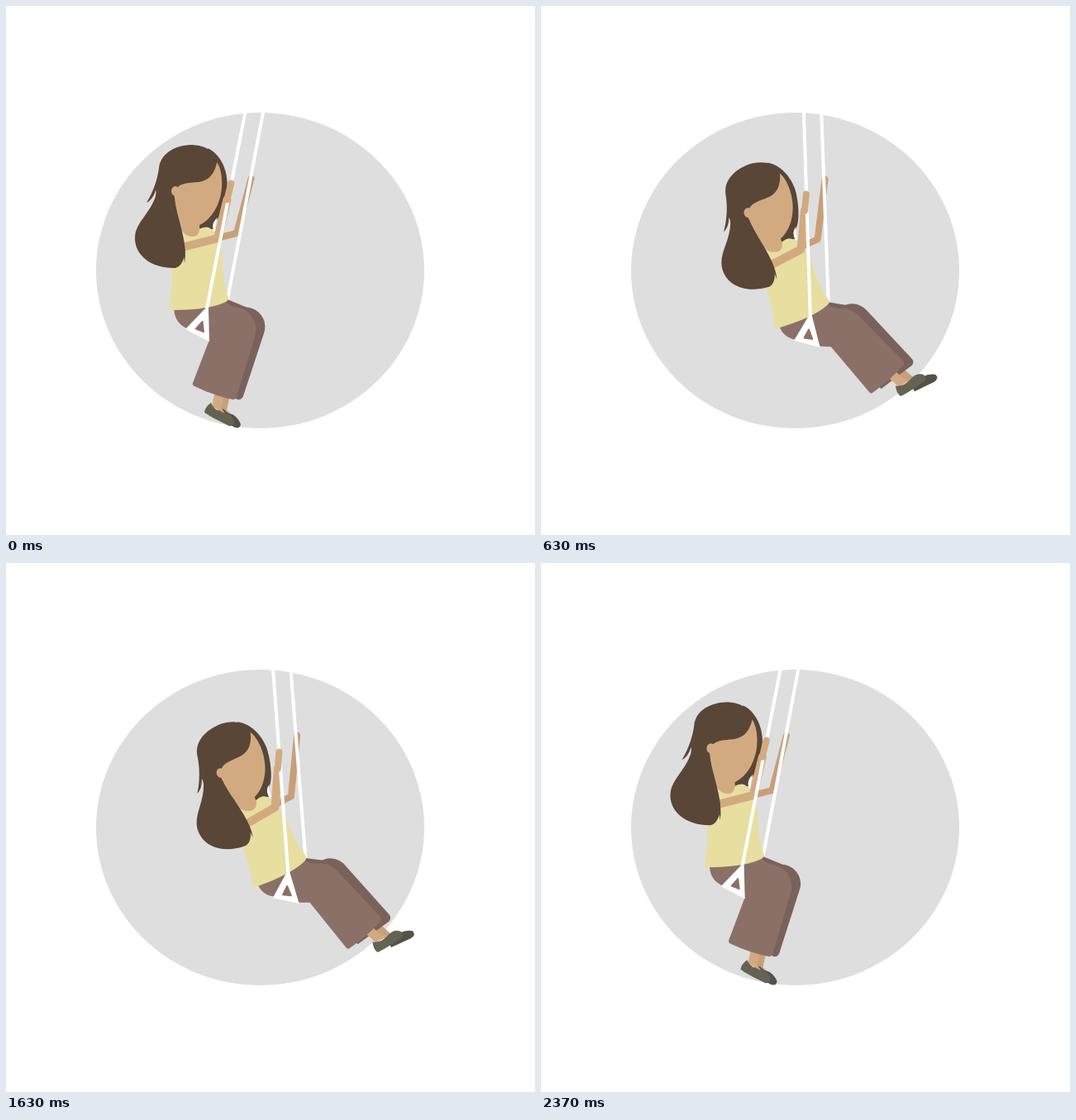
These frames come from a looping animation (640x640 px, 2.41 s). An HTML page:

```html
<!DOCTYPE html>
<html lang="en">
<head>
<meta charset="utf-8">
<title>Girl on a swing</title>
<style>
  html, body { margin: 0; width: 100%; height: 100%; overflow: hidden; background: #fff; }
  svg { display: block; width: 100vw; height: 100vh; }
  .arm { fill: none; stroke-linecap: round; stroke-linejoin: round; }
  .rope { stroke: #fff; stroke-width: 4; }
  .hair { fill: #594637; }
  .skin { fill: #d3aa80; }
  .skin2 { fill: #c99f77; }
  .pants { fill: #8b7068; }
  .pants2 { fill: #7a625b; }
</style>
</head>
<body>
<svg viewBox="0 0 640 640">
  <ellipse cx="307.5" cy="320" rx="198.5" ry="191" fill="#dedede"/>

  <g data-part="torso">
    <path class="hair" d="M244 172C262 180 270 205 267 222C265 240 260 256 252 262L251 270L233 270L238 240Z"/>
    <path fill="#fff" d="M256 256Q248 262 251 272L254 272Q252 264 256 256Z"/>
  </g>

  <polyline id="backArm" class="arm" stroke="#c99f77" stroke-width="8"/>
  <g data-part="swing"><path class="rope" d="M335 3L268 355"/></g>

  <g data-part="backShin">
    <path class="skin2" d="M261 468L271 471L267 489L275 496L258 492Z"/>
    <path fill="#545146" d="M258 487L254 494L275 509Q283 513 284 506Q281 498 274 494Q267 493 264 488Z"/>
    <path class="pants2" d="M268 380L237 457L280 476Q285 477 287 472L312 396A23 23 0 0 0 268 380Z"/>
  </g>
  <g data-part="swing">
    <path class="pants2" d="M255 352L268 355L297 367A22 22 0 0 1 290 410L255 400Z"/>
  </g>
  <g data-part="shin">
    <path class="skin" d="M253 466L264 469L260 486L266 494L249 484Z"/>
    <path fill="#646353" d="M248 480Q241 485 240 491Q241 494 270 508Q276 509 276 502Q274 494 264 492Q252 490 248 480Z"/>
    <path class="pants" d="M254 383L226 456Q225 459 228 460Q250 471 274 476Q277 477 279 473L301 400A22 24 0 0 0 254 383Z"/>
  </g>
  <g data-part="swing">
    <path class="pants" d="M203 362C203 386 216 388 226 394L247 405L280 414A22 22 0 0 0 289 372L262 356Z"/>
  </g>

  <g data-part="torso">
    <path fill="#e8de9f" d="M214 277L233 270Q245 264 250 272C256 282 261 292 262 305Q262 335 269 352Q270 356 266 358Q245 368 200 368Q196 368 197 364C202 345 201 325 200 310Z"/>
    <path class="skin" d="M206 212L252 186C263 194 263 222 258 235C254 248 245 260 234 265C235 272 233 279 226 279C219 279 214 275 212 270L204 234Z"/>
  </g>

  <polyline id="frontArm" class="arm" stroke="#d3aa80" stroke-width="10"/>
  <g data-part="swing">
    <path class="rope" d="M314 3L242 371"/>
    <path fill="#fff" d="M240 367L245 367L246 406L217 391Z"/>
    <path fill="#8b7068" stroke="#8b7068" stroke-width="2" stroke-linejoin="round" d="M237.500 382L239 394L230 390.500Z"/>
  </g>
  <polyline id="hand" class="arm" stroke="#d3aa80" stroke-width="8"/>

  <g data-part="torso">
    <path class="hair" d="M250 178C256 183 256 188 254 194C250 206 243 212 232 213C222 214 213 214 208 219Q203 222 204 232C206 250 213 268 216 288C218 302 213 317 203 317C176 317 156 302 156 281C156 262 174 252 181 230Q182 224 181 223Q178 234 170 238C180 222 184 205 185 196C187 178 205 168 226 168Q243 169 250 178Z"/>
    <path class="hair" d="M213 280Q219 296 216 311Q215 300 213 294Z"/>
    <ellipse class="skin" cx="205" cy="224" rx="5" ry="6"/>
  </g>
</svg>

<script>
const LOOP = 2410;
const TIMES = [0, 430, 870, 1200, 1630, 1970, LOOP];
const SWING = [0, 7.4, 18.3, 20.15, 15.3, 7.2, 0];
const SHIN = [0, 45.6, 72.6, 75.5, 60, 31.8, 0];

// Smooth curve through the keys that never overshoots them.
function track(values) {
  const slope = i => (values[i + 1] - values[i]) / (TIMES[i + 1] - TIMES[i]);
  const tangents = values.map((_, i) => {
    if (i === 0 || i === values.length - 1) return 0;
    const a = slope(i - 1), b = slope(i);
    return a * b > 0 ? 2 * a * b / (a + b) : 0;
  });
  return time => {
    let i = 0;
    while (time > TIMES[i + 1]) i++;
    const span = TIMES[i + 1] - TIMES[i], u = (time - TIMES[i]) / span, v = 1 - u;
    return v * v * (1 + 2 * u) * values[i] + u * u * (3 - 2 * u) * values[i + 1]
      + span * u * v * (v * tangents[i] - u * tangents[i + 1]);
  };
}

const swingAt = track(SWING), shinAt = track(SHIN);
const parts = [...document.querySelectorAll('[data-part]')];
const turn = (m, angle, x, y) => m.translate(x, y).rotate(angle).translate(-x, -y);
const place = (m, x, y, dx = 0, dy = 0) => {
  const p = m.transformPoint({ x, y });
  return [p.x + dx, p.y + dy];
};
const draw = (id, ...points) =>
  document.getElementById(id).setAttribute('points', points.join(' '));

function render(time) {
  const q = swingAt(time), bend = q - shinAt(time);
  const base = turn(new DOMMatrix(), -q, 314, 3);
  const swing = turn(new DOMMatrix().translate(0, 0.15 * q), -q, 314, 3);
  const torso = turn(swing, -0.26 * q, 269, 355);
  const pose = {
    swing, torso,
    shin: turn(base, bend, 279, 392),
    backShin: turn(base, bend, 290, 388)
  };
  for (const part of parts) part.setAttribute('transform', pose[part.dataset.part]);

  draw('backArm', place(torso, 250, 282),
    place(torso, 279, 275, -0.1 * q, 0.3 * q), place(swing, 296.5, 209, 0.05 * q));

  const elbow = place(torso, 256, 281, -0.08 * q, 0.3 * q);
  const hand = place(swing, 272.3 - 0.1 * q, 214.5 + 0.55 * q);
  const wrist = hand.map((h, i) => h + (elbow[i] - h) * 0.3);
  draw('frontArm', place(torso, 205, 294), elbow, wrist);
  draw('hand', wrist, hand);
}

function frame() {
  render(performance.now() % LOOP);
  requestAnimationFrame(frame);
}
frame();
</script>
</body>
</html>
```
